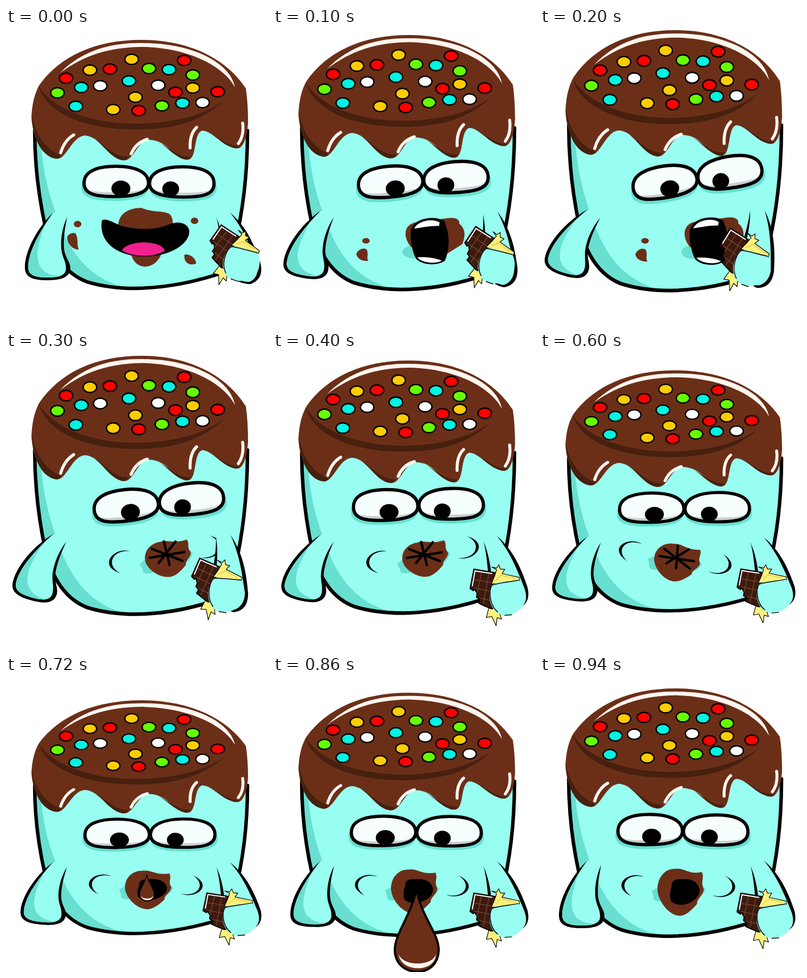
These frames come from a looping animation (482 px wide and 548 px high, 0.96 s). An HTML page:

```html
<!DOCTYPE html>
<html lang="en">
<head>
<meta charset="utf-8">
<title>Marshmallow eating chocolate</title>
<style>
html, body { margin: 0; width: 100%; height: 100%; overflow: hidden; background: #fff; }
svg { display: block; width: 482px; height: 548px; }
.aqua { fill: #98fef1; }
.teal { fill: #68dfd0; }
.brown { fill: #6b2f18; }
.dark { fill: #47200f; }
.white { fill: #fff6f0; }
.line { fill: none; stroke: #000; stroke-linecap: round; stroke-linejoin: round; }
.shine { fill: none; stroke: #fff6f0; stroke-width: 5.5; stroke-linecap: round; }
.foil { fill: #fdf07c; stroke: #000; stroke-width: 1.2; stroke-linejoin: round; }
</style>
</head>
<body>
<svg viewBox="0 0 482 548">
<defs>
  <g id="eye">
    <path fill="#c9cfce" d="M144 287C144 262 175 256 203 256C235 256 263 265 263 287C263 305 240 312 200 312C165 312 144 308 144 287Z"/>
    <path fill="#f6fffd" d="M144 287C144 262 175 256 203 256C235 256 263 265 263 287C263 301 240 304 200 304C165 304 144 303 144 287Z"/>
    <path class="line" stroke-width="6" d="M144 287C144 262 175 256 203 256C235 256 263 265 263 287C263 305 240 312 200 312C165 312 144 308 144 287Z"/>
  </g>
  <path id="eyeShade" class="teal" d="M139 295C139 270 175 264 203 264C235 264 263 273 263 295C263 313 240 320 200 320C165 320 139 316 139 295Z"/>
  <path id="cheek" d="M-66 -18C-94 -31 -130 -2 -89 18C-116 0 -98 -27 -66 -18Z"/>
</defs>
<g id="all">
  <!-- body -->
  <path class="aqua" d="M53 190C53 250 60 310 72 365C85 420 110 455 150 470C180 479 215 482 240 482C300 481 350 470 400 453C425 420 446 310 446 190Z"/>
  <path class="teal" d="M53 190C53 250 60 310 72 365C85 420 110 455 150 470C175 478 200 481 225 481C150 465 115 410 95 350C75 300 66 250 64 200Z"/>
  <path class="line" stroke-width="6.5" d="M53 190C53 250 60 310 72 365C85 420 110 455 150 470C180 479 215 482 240 482C300 481 350 470 400 453C425 420 446 310 446 190"/>

  <!-- chocolate topping -->
  <path class="brown" d="M47 165C48 140 53 120 62 105C100 52 165 22 250 22C340 22 408 58 443 112Q447 140 447 175C445 205 437 223 427 223C402 220 382 190 362 190C345 196 354 244 335 244C308 240 298 207 264 207C243 208 236 245 219 245C188 243 175 200 146 199C122 200 112 242 95 242C68 240 49 205 47 165Z"/>
  <g class="dark">
    <path d="M60 107C90 155 165 177 240 177C310 177 370 160 405 132C365 172 310 188 240 188C150 188 75 160 60 107Z"/>
    <path d="M48 162C55 200 75 226 103 237Q98 243 92 242C68 238 50 210 48 162Z"/>
    <path d="M148 199C178 206 195 240 226 238Q222 246 215 245C188 240 175 203 148 199Z"/>
    <path d="M268 207C297 212 310 240 341 238Q337 246 328 243C303 234 292 210 268 207Z"/>
    <path d="M365 190C387 195 408 221 433 219Q426 225 417 221C396 214 385 195 365 190Z"/>
  </g>
  <path class="white" d="M100 83C145 38 200 27 255 28C340 28 414 62 423 110C402 70 335 36 250 35C190 36 145 50 100 83Z"/>
  <path class="shine" d="M101 231Q108 208 125 198M231 233Q240 212 261 206M340 222Q339 196 352 184M429 214Q440 200 437 176"/>
  <g id="sprinkles" stroke="#000" stroke-width="2.5"></g>

  <!-- laughing mouth -->
  <g id="laugh">
    <path class="brown" d="M208 374C203 348 222 333 250 333C270 342 290 338 301 344C310 350 307 365 309 374L286 420C275 447 240 451 231 420Z"/>
    <path d="M177 356C185 351 200 362 215 367C245 374 275 374 300 364C320 356 335 362 338 374C342 394 310 423 255 423C205 423 170 396 177 356Z"/>
    <path fill="#f0208e" d="M214 412C222 393 285 391 293 412C275 425 235 425 214 412Z"/>
    <g class="brown">
      <ellipse cx="132" cy="363" rx="7" ry="6"/>
      <ellipse cx="348" cy="357" rx="7" ry="6"/>
      <path d="M113 391C111 382 122 378 128 380C134 388 130 400 134 410C125 411 115 402 113 391Z"/>
      <path d="M329 420C336 417 350 424 351 436C342 440 328 438 329 420Z"/>
    </g>
  </g>

  <!-- biting mouth -->
  <g id="bite">
    <ellipse class="teal" cx="283" cy="414" rx="22" ry="12"/>
    <path class="brown" d="M277 405C260 385 265 362 290 360L345 353C358 351 368 355 366 363C378 372 378 385 372 400L340 420Z"/>
    <path d="M277 374C284 350 325 349 338 358C348 378 350 405 340 430C325 440 298 438 287 427C279 415 275 390 277 374Z"/>
    <path fill="#fff" d="M283 372C290 357 318 353 330 361L329 367C312 367 298 370 283 372Z"/>
    <path fill="#fff" d="M289 424C300 423 320 424 334 430C325 436 298 435 289 424Z"/>
    <ellipse class="brown" cx="194" cy="394" rx="7" ry="5"/>
    <path class="brown" d="M176 418C180 408 192 405 196 411C199 420 194 428 199 430C190 432 178 428 176 418Z"/>
  </g>

  <!-- chewing and open lips -->
  <g id="lips">
    <path class="teal" d="M-52 8Q-25 -10 0 -5Q30 -15 48 5Q40 22 20 24L-20 25Q-52 32 -48 18Z"/>
    <use href="#cheek"/>
    <use href="#cheek" transform="translate(-5 -2) rotate(180)"/>
    <g id="ring">
      <path class="brown" d="M-41 3C-40 -20 -25 -34 -8 -33C8 -36 15 -22 41 -27C46 -15 38 -10 44 3C46 15 31 22 32 32C20 46 10 54 0 54C-20 54 -42 25 -41 3Z"/>
      <path id="hole" d="M-15 0C-16 -18 5 -14 15 -14C38 -10 42 10 30 22C15 36 -5 37 -16 27C-20 15 -17 8 -15 0Z"/>
    </g>
    <path id="pucker" class="line" stroke-width="4.5" d="M-32 0L33 1M-25 -15L27 16M-1 -24L2 19M20 -20L-17 12"/>
  </g>

  <!-- eyes -->
  <g id="eyes">
    <use href="#eyeShade"/>
    <use href="#eyeShade" transform="translate(528 1) scale(-1 1)"/>
    <use href="#eye"/>
    <use href="#eye" transform="translate(528 1) scale(-1 1)"/>
    <ellipse id="pupilL" cy="297" rx="17.5" ry="14.5"/>
    <ellipse id="pupilR" cy="298" rx="15.5" ry="14"/>
  </g>

  <!-- left arm -->
  <g id="armL">
    <path d="M87 342C62 365 35 410 35 443C35 462 50 467 78 467C105 467 119 460 119 444C119 432 108 425 107 405C106 385 110 365 113 350Z"/>
    <path class="aqua" d="M87 342C65 372 41 415 41 443C41 458 55 462 78 462C98 462 111 458 111 445C111 430 103 425 102 405C101 385 106 365 113 350Q100 336 87 342Z"/>
    <path class="teal" d="M72 365C55 390 41 420 41 443C41 458 55 462 78 462C88 462 96 461 102 459C55 458 48 425 72 365Z"/>
  </g>

  <!-- right arm -->
  <g id="armR">
    <path d="M414 342C445 368 460 405 470 435C475 456 468 468 452 474C430 474 405 460 400 430C396 405 396 380 389 352Z"/>
    <path class="aqua" d="M414 342C437 370 450 400 464 436C468 452 461 466 450 470C430 470 408 460 404 430C404 405 399 375 389 352Q402 338 414 342Z"/>
  </g>

  <!-- chocolate bar in the hand, origin at the palm -->
  <g id="bar">
    <path class="foil" d="M-33 10L-39 33L-29 31L-21 48L-19 33L-11 36L-17 18Z"/>
    <path fill="#3c1a0e" stroke="#000" stroke-width="2" d="M-62 -55L-20 -48L-20 16L-30 17L-42 12L-53 7L-51 0L-57 -4L-56 -11L-61 -19L-63 -16L-69 -20Z"/>
    <path fill="none" stroke="#74402c" stroke-width="1.5" d="M-48 -49L-56 -12M-34 -48L-45 9M-61 -36L-26 -30M-62 -21L-28 -14M-52 -3L-28 3"/>
    <path fill="none" stroke="#fff" stroke-width="2" d="M-65 -24L-60 -52L-28 -47"/>
    <path class="foil" d="M-30 -28L-24 -42L-20 -54L-29 -59L-20 -57L-16 -63L-13 -55L-5 -55L-10 -47L22 -40L22 -34Z"/>
    <path fill="none" stroke="#d2b93c" d="M-22 -34L-12 -44L14 -38"/>
    <path class="aqua" d="M-31 -22C-30 -32 -5 -32 20 -35C34 -25 38 -2 31 8C22 22 10 29 -5 29C-25 28 -38 5 -31 -22Z"/>
    <path class="line" stroke-width="1.5" d="M-18 23C-36 8 -35 -27 -25 -27C-10 -31 5 -32 20 -35M-5 29L8 28"/>
  </g>

  <!-- falling drop -->
  <g id="drop">
    <path class="brown" stroke="#000" stroke-width="4" stroke-linejoin="round" d="M0 0C6 50 41 85 41 117C41 145 22 159 2 159C-20 159 -40 145 -40 117C-40 85 -8 50 0 0Z"/>
    <path class="white" d="M-33 126C-24 149 28 149 36 126C34 161 -28 161 -33 126Z"/>
  </g>
</g>
</svg>
<script>
const LOOP = 960;
const $ = id => document.getElementById(id);
const move = (id, transform) => $(id).setAttribute('transform', transform);
const show = (id, on) => $(id).setAttribute('display', on ? 'inline' : 'none');

// Linear interpolation through [time, value] pairs
function at(t, ...keys) {
  if (t <= keys[0][0]) return keys[0][1];
  for (let i = 1; i < keys.length; i++) {
    const [a, x] = keys[i - 1], [b, y] = keys[i];
    if (t <= b) return x + (y - x) * (t - a) / (b - a);
  }
  return keys[keys.length - 1][1];
}

const sprinkles = {
  '#fc0': [[232, 58], [155, 78], [239, 128], [198, 151], [345, 111]],
  '#f00': [[111, 93], [192, 76], [329, 60], [313, 119], [391, 118], [245, 153]],
  '#6f0': [[264, 75], [345, 87], [95, 120], [288, 144]],
  '#00f4e2': [[139, 110], [227, 98], [301, 77], [129, 145], [326, 139]],
  '#fff': [[174, 107], [281, 106], [363, 138]]
};
for (const color in sprinkles)
  for (const [x, y] of sprinkles[color])
    $('sprinkles').innerHTML += `<ellipse cx="${x}" cy="${y}" rx="12.5" ry="9.5" fill="${color}"/>`;

function draw(t) {
  const squash = at(t, [0, 0], [235, -21], [470, 0], [720, 23], [950, 0]);
  move('all', `translate(0 396) scale(1 ${1 - squash / 374}) translate(0 -396)`);

  const turn = at(t, [0, 0], [200, 1], [240, 1], [400, .17], [940, 0]);
  move('eyes', `translate(${26.5 * turn} ${-3 * turn}) rotate(${-8.6 * turn} 263.5 285)`);
  $('pupilL').setAttribute('cx', 212 - 6 * t / LOOP);
  $('pupilR').setAttribute('cx', 304 + 9 * t / LOOP);

  move('armL', `rotate(${at(t, [0, 0], [180, 17], [940, 0])} 100 345)`);
  const reach = at(t, [0, 0], [200, 1], [240, 1], [400, 0]);
  move('armR', `rotate(${22 * reach} 418 344)`);
  const palmX = at(t, [0, 432], [200, 388], [240, 388], [400, 433]);
  const palmY = at(t, [0, 440], [200, 446], [240, 446], [400, 457]);
  move('bar', `translate(${palmX} ${palmY}) rotate(${at(t, [0, 24], [240, 22], [400, 0])})`);

  const chewing = t >= 300, open = t >= 680;
  show('laugh', t < 100);
  show('bite', t >= 100 && !chewing);
  show('lips', chewing);
  show('pucker', !open);
  show('hole', open);
  move('laugh', `translate(${40 * turn} 0) rotate(${-8.6 * turn} 257 385)`);
  move('bite', `translate(${45 * (turn - 1)} 0)`);

  const lipX = at(t, [300, 297], [400, 279], [600, 252], [700, 261], [940, 258]);
  const lipY = at(t, [400, 376], [600, 381.5], [720, 387], [940, 390]);
  const tilt = at(t, [400, -10], [600, 8], [690, 0]);
  move('lips', `translate(${lipX} ${lipY}) rotate(${tilt})`);
  move('ring', `scale(1 ${at(t, [400, .74], [600, .82], [720, .87], [940, 1])})`);

  const size = at(t, [690, .12], [720, .33], [860, 1]);
  const dropY = at(t, [690, 362], [720, 365], [860, 390], [930, 556]);
  move('drop', `translate(${at(t, [720, 260], [860, 265])} ${dropY}) scale(${size})`);
  show('drop', t >= 690 && t < 935);
}

function tick() {
  draw(performance.now() % LOOP);
  requestAnimationFrame(tick);
}
tick();
</script>
</body>
</html>
```
